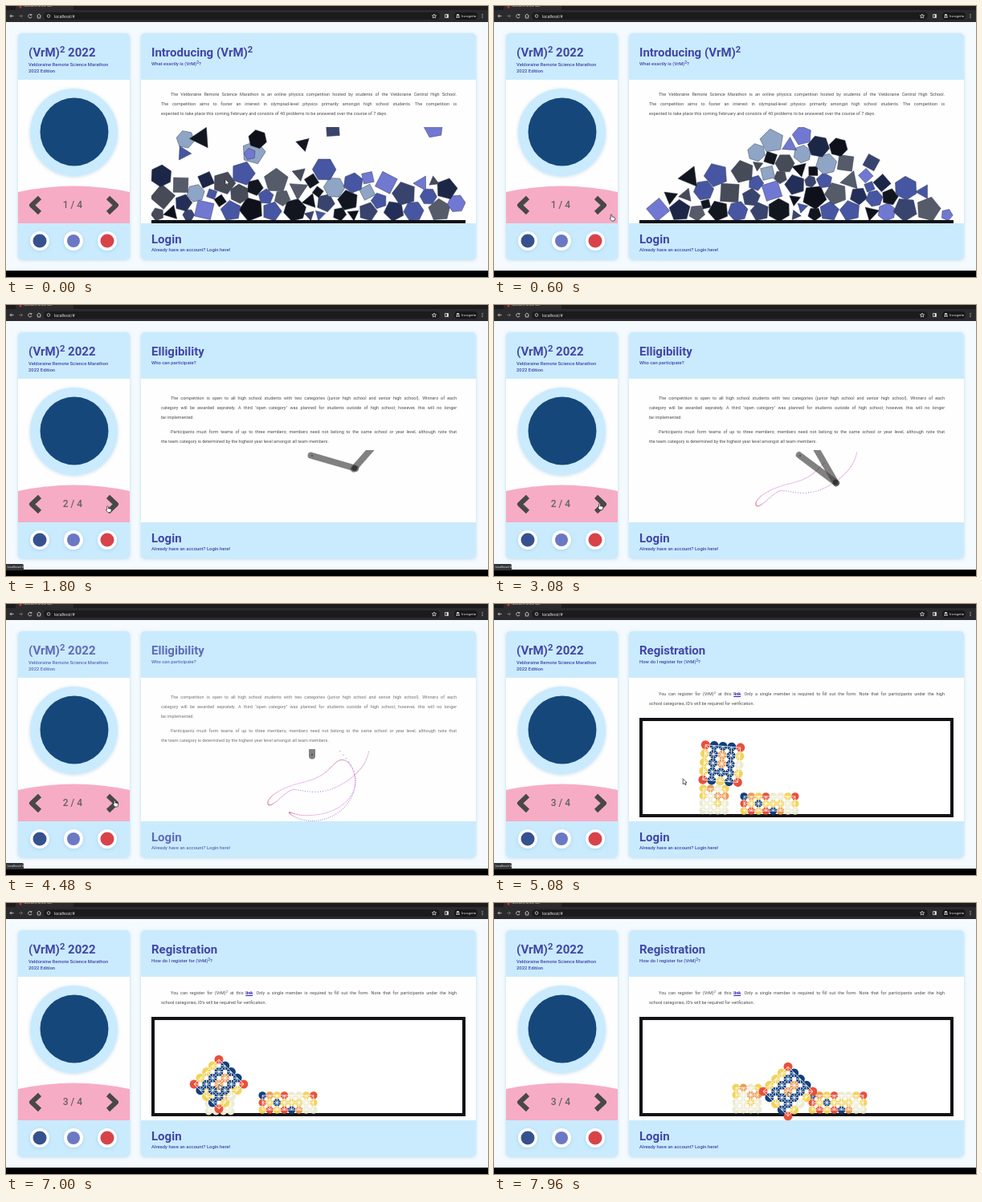
An HTML page with a canvas for the animation above (8000 ms loop, 600 by 338 pixels).

```html
<!DOCTYPE html>
<html lang="en">
<head>
<meta charset="utf-8">
<title>Physics competition</title>
<style>
  html, body { margin: 0; width: 100%; height: 100%; overflow: hidden; background: #f4fafe; }
  body { position: relative; font-family: Roboto, sans-serif; color: #4245a8; }
  svg, canvas { position: absolute; left: 0; top: 0; width: 600px; height: 338px; }
  .label { position: absolute; white-space: nowrap; font-weight: 500; font-size: 5.9px; line-height: 8px; }
  .title { font-weight: 700; font-size: 15px; line-height: 16px; }
  sup { font-size: 75%; line-height: 0; position: relative; top: -.42em; vertical-align: baseline; }
  .page { position: absolute; inset: 0; visibility: hidden; }
  .line { position: absolute; left: 193px; width: 368px; box-sizing: border-box; line-height: 12px;
    font-size: 5.5px; color: #4c4c4c; white-space: nowrap; }
  .indent { padding-left: 12px; }
  .full { text-align-last: justify; white-space: normal; word-spacing: -.3px; }
  .line b { color: #2a1fb8; text-decoration: underline; }
  #counter { position: absolute; left: 58px; top: 240px; width: 50px; text-align: center;
    font-size: 12px; line-height: 16px; font-weight: 500; color: #626262; }
  .chrome { color: #e4e4e4; font-size: 5px; font-weight: 400; }
  #status { position: absolute; left: 0; top: 323px; width: 22px; height: 8px; background: #333438;
    color: #ddd; font-size: 4px; line-height: 8px; text-indent: 1.5px; border-radius: 0 2px 0 0; }
  .floor { position: absolute; left: 181px; top: 267px; width: 391px; height: 4px; background: #111015; }
  .tank { position: absolute; left: 181px; top: 142px; width: 391px; height: 124px; box-sizing: border-box;
    border: 4px solid #141217; background: #fff; }
</style>
</head>
<body>
<svg viewBox="0 0 600 338">
  <defs>
    <filter id="soft" x="-20%" y="-20%" width="140%" height="140%">
      <feDropShadow dx="0" dy="1" stdDeviation="2" flood-color="#7fb4d4" flood-opacity=".45"/>
    </filter>
    <clipPath id="left"><rect x="15" y="34" width="139" height="282" rx="5"/></clipPath>
  </defs>
  <g filter="url(#soft)" fill="#caebfd">
    <rect x="15" y="34" width="139" height="282" rx="5"/>
    <rect x="168" y="34" width="417" height="282" rx="5"/>
  </g>
  <g clip-path="url(#left)">
    <path d="M15 92h139v179H15z" fill="#fefefe"/>
    <path d="M15 232Q84.500 217 154 232V271H15z" fill="#f7acc5"/>
  </g>
  <path d="M168 92h417v179H168z" fill="#fefefe"/>
  <g filter="url(#soft)">
    <circle cx="84.500" cy="157.500" r="54.500" fill="#caebfd"/>
    <g fill="#fff">
      <circle cx="42" cy="293" r="12"/><circle cx="84" cy="293" r="12"/><circle cx="126" cy="293" r="12"/>
    </g>
  </g>
  <circle cx="85" cy="157" r="42.500" fill="#15477a"/>
  <circle cx="42" cy="293" r="8.500" fill="#35528f"/>
  <circle cx="84" cy="293" r="8" fill="#6b78c4"/>
  <circle cx="126" cy="293" r="8.500" fill="#d8434a"/>
  <path d="M42 239L32 248.500L42 258M127 239L137 248.500L127 258" fill="none" stroke="#484848" stroke-width="6" stroke-linejoin="round"/>

  <path d="M0 0h600v20H0z" fill="#2b2b2e"/>
  <path d="M0 0h600v5H0z" fill="#1c1c1f"/>
  <path d="M12 0h72v5H12z" fill="#2b2b2e"/>
  <path d="M0 330h600v8H0z" fill="#000"/>
  <rect x="47" y="8" width="493" height="9" rx="4.500" fill="#1b1b1e"/>
  <rect x="558" y="8" width="29" height="9" rx="4.500" fill="#17171a"/>
  <g fill="none" stroke="#d6d6d6" stroke-width=".8">
    <path d="M9.500 12.500H5M7 10.500L5 12.500L7 14.500"/>
    <path d="M16 12.500h4.500M18.500 10.500L20.500 12.500L18.500 14.500" stroke="#777"/>
    <path d="M31.500 11.200A2.200 2.200 0 1 0 32 13.200M31.800 10v1.500h-1.500"/>
    <path d="M38.500 12.300L41 10L43.500 12.300M39.300 12v3h3.400v-3"/>
    <circle cx="53" cy="12.500" r="1.800"/>
    <path d="M533 10l.8 1.800 1.900.1-1.500 1.200.5 1.900-1.700-1.100-1.700 1.100.5-1.900-1.500-1.200 1.900-.1z"/>
    <path d="M546.500 10.500h4v4h-4zM549 10.500v4"/>
  </g>
  <path d="M549 10.500h1.500v4H549zM560.500 12h4v-.7h-.7l-.5-1.300h-1.600l-.5 1.300h-.7z" fill="#e4e4e4"/>
  <g fill="#e4e4e4">
    <circle cx="561.400" cy="13.800" r="1"/><circle cx="563.700" cy="13.800" r="1"/>
    <circle cx="593" cy="10.500" r=".6"/><circle cx="593" cy="12.500" r=".6"/><circle cx="593" cy="14.500" r=".6"/>
  </g>
  <circle cx="18" cy="1" r="1.500" fill="#c33"/>
</svg>
<div class="label chrome" style="left:60px;top:8.500px">localhost/#</div>
<div class="label chrome" style="left:567px;top:8.500px;font-size:4.400px">Incognito</div>
<div class="label chrome" style="left:22px;top:-4.500px;font-size:4px">Welcome to our site</div>

<div id="texts">
  <div class="label title" style="left:28px;top:50px">(VrM)<sup>2</sup> 2022</div>
  <div class="label" style="left:28px;top:69px">Veldoraine Remote Science Marathon<br>2022 Edition</div>
  <div class="label title" style="left:181px;top:283px">Login</div>
  <div class="label" style="left:181px;top:300px">Already have an account? Login here!</div>

  <section class="page">
    <div class="label title" style="left:181px;top:50px">Introducing (VrM)<sup>2</sup></div>
    <div class="label" style="left:181px;top:67.500px">What exactly is (VrM)<sup>2</sup>?</div>
    <div class="line full indent" style="top:103.500px">The Veldoraine Remote Science Marathon is an online physics competition hosted by students of the Veldoraine Central High School.</div>
    <div class="line full" style="top:115.500px">The competition aims to foster an interest in olympiad-level physics primarily amongst high school students. The competition is</div>
    <div class="line" style="top:127.500px">expected to take place this coming February and consists of 40 problems to be answered over the course of 7 days.</div>
    <div class="floor"></div>
  </section>
  <section class="page">
    <div class="label title" style="left:181px;top:50px">Elligibility</div>
    <div class="label" style="left:181px;top:67.500px">Who can participate?</div>
    <div class="line full indent" style="top:109.500px">The competition is open to all high school students with two categories (junior high school and senior high school). Winners of each</div>
    <div class="line full" style="top:121.500px">category will be awarded seprately. A third "open category" was planned for students outside of high school; however, this will no longer</div>
    <div class="line" style="top:133.500px">be implemented.</div>
    <div class="line full indent" style="top:151.500px">Participants must form teams of up to three members; members need not belong to the same school or year level, although note that</div>
    <div class="line" style="top:163.500px">the team category is determined by the highest year level amongst all team members.</div>
  </section>
  <section class="page">
    <div class="label title" style="left:181px;top:50px">Registration</div>
    <div class="label" style="left:181px;top:67.500px">How do I register for (VrM)<sup>2</sup>?</div>
    <div class="line full indent" style="top:105.500px">You can register for (VrM)<sup>2</sup> at this <b>link</b>. Only a single member is required to fill out the form. Note that for participants under the high</div>
    <div class="line" style="top:117.500px">school categories, ID's will be required for verification.</div>
    <div class="tank"></div>
  </section>
</div>
<div id="counter"></div>
<div id="status">localhost/#</div>
<canvas></canvas>

<script>
const LOOP = 8000, PAGE_2 = 1760, PAGE_3 = 4520, SWING = 1800;
const pages = document.querySelectorAll('.page');
const [texts, counter, status] = ['texts', 'counter', 'status'].map(id => document.getElementById(id));
const canvas = document.querySelector('canvas'), ctx = canvas.getContext('2d');
const scale = Math.max(1, window.devicePixelRatio || 1);
canvas.width = 600 * scale;
canvas.height = 338 * scale;

const clamp = v => Math.min(1, Math.max(0, v));
const ramp = (t, from, to) => clamp((t - from) / (to - from));
const ease = u => u * u * (3 - 2 * u);
const mix = (a, b, u) => a + (b - a) * u;

let seed = 23;
const random = () => (seed = (seed * 16807) % 2147483647) / 2147483647;
const between = (a, b) => mix(a, b, random());
const pick = list => list[Math.floor(random() * list.length)];

// Both read rows of [time, ...values]: glide rests at each row, curve flows through them.
const segment = (rows, t) => Math.max(0, Math.min(rows.length - 2, rows.findIndex(row => row[0] > t) - 1));
function glide(rows, t) {
  if (t >= rows[rows.length - 1][0]) return rows[rows.length - 1].slice(1);
  const i = segment(rows, t), p = rows[i], q = rows[i + 1];
  const u = ease(ramp(t, p[0], q[0]));
  return p.slice(1).map((v, k) => mix(v, q[k + 1], u));
}
function curve(rows, t) {
  if (t >= rows[rows.length - 1][0]) return rows[rows.length - 1].slice(1);
  const i = segment(rows, t), p = rows[i], q = rows[i + 1];
  const before = rows[i - 1] || p, after = rows[i + 2] || q;
  const span = q[0] - p[0], u = ramp(t, p[0], q[0]);
  return p.slice(1).map((v, k) => {
    const n = k + 1, d = q[n] - v;
    const m0 = (q[n] - before[n]) / (q[0] - before[0]) * span;
    const m1 = (after[n] - p[n]) / (after[0] - p[0]) * span;
    return v + u * (m0 + u * (3 * d - 2 * m0 - m1 + u * (m0 + m1 - 2 * d)));
  });
}

function clipped(x, y, w, h, draw) {
  ctx.save();
  ctx.beginPath();
  ctx.rect(x, y, w, h);
  ctx.clip();
  draw();
  ctx.restore();
}

function dot(x, y, r) {
  ctx.beginPath();
  ctx.arc(x, y, r, 0, 7);
  ctx.fill();
}

const tones = ['#0e1119', '#12161f', '#1c2647', '#232f58', '#39446e', '#4656a3', '#4656a3', '#7078d2', '#464b57', '#555b68', '#8fa5c6'];
const polygons = Array.from({ length: 60 }, () => ({
  r: between(7, 16), sides: pick([3, 4, 4, 5, 5, 5, 6]), color: pick(tones),
  angle: between(0, 6.28), spin: between(-2.5, 2.5)
}));

// Drops each shape where it lands deepest; a steeper slope piles them towards the middle.
function heap(slope, airborne) {
  const placed = [];
  for (const p of polygons) {
    const r = p.r * .88;
    let best = null;
    for (let tries = 0; tries < 70; tries++) {
      const x = between(181 + r, 572 - r);
      let y = 267 - r;
      for (const o of placed) {
        const reach = r + o.r, dx = x - o.x;
        if (Math.abs(dx) < reach) y = Math.min(y, o.y - Math.sqrt(reach * reach - dx * dx));
      }
      const depth = y - slope * Math.abs(x - 380);
      if (!best || depth > best.depth) best = { x, y, r, depth };
    }
    if (polygons.length - placed.length <= airborne) best = { x: between(185, 565), y: between(152, 185), r };
    placed.push(best);
  }
  return placed;
}
const scattered = heap(.04, 9), piled = heap(.5, 0), settled = piled.map(p => ({
  x: p.x + (p.x - 380) * .12, y: p.y + Math.max(0, 250 - p.y) * .25
}));

function drawPolygons(t) {
  const u = ease(ramp(t, 0, 600)), v = ramp(t, 600, PAGE_2);
  clipped(181, 151, 391, 116, () => {
    ctx.lineWidth = .5;
    ctx.strokeStyle = '#343a52';
    polygons.forEach((p, n) => {
      const x = mix(scattered[n].x, mix(piled[n].x, settled[n].x, v), u);
      const y = mix(scattered[n].y, mix(piled[n].y, settled[n].y, v), u);
      const angle = p.angle + p.spin * (u + v * .3);
      ctx.beginPath();
      for (let i = 0; i < p.sides; i++) {
        const a = angle + i * 2 * Math.PI / p.sides;
        ctx.lineTo(x + p.r * Math.cos(a), y + p.r * Math.sin(a));
      }
      ctx.closePath();
      ctx.fillStyle = p.color;
      ctx.fill();
      ctx.stroke();
    });
  });
}

// Double pendulum: time and both angles, in degrees from straight down.
const swing = [
  [1800, 74, 139], [2110, 5, 120], [2290, -60, 53], [2500, -41, -41], [2780, 0, -131], [3080, 53, -150],
  [3320, 33, -239], [3560, 5, -340], [3760, -8, -408], [3940, 9, -399], [4300, 90, -362], [4480, 180, -440]];
const ARM = 55, PIVOT = { x: 381, y: 188 };
const along = (from, degrees, length) => ({
  x: from.x + length * Math.sin(degrees * Math.PI / 180),
  y: from.y + length * Math.cos(degrees * Math.PI / 180)
});
function pendulum(t) {
  const [a1, a2] = curve(swing, t), elbow = along(PIVOT, a1, ARM);
  return { a1, a2, elbow, middle: along(elbow, a2, ARM / 2) };
}
const trail = [];
for (let t = SWING; t <= 4480; t += 9) trail.push({ t, ...pendulum(t).middle });

function drawRod(from, angle) {
  const a = along(from, angle, -1.5), b = along(from, angle, ARM + 1.5);
  ctx.beginPath();
  ctx.moveTo(a.x, a.y);
  ctx.lineTo(b.x, b.y);
  ctx.stroke();
}

function drawPendulum(t) {
  const { a1, a2, elbow } = pendulum(t);
  clipped(181, 181, 391, 90, () => {
    for (let i = 1; i < trail.length && trail[i].t < t; i++) {
      const p = trail[i], speed = Math.hypot(p.x - trail[i - 1].x, p.y - trail[i - 1].y);
      ctx.fillStyle = `hsl(${360 - 120 * clamp(speed / 4)}, 50%, 66%)`;
      ctx.fillRect(p.x - .5, p.y - .5, 1, 1);
    }
    ctx.lineCap = 'round';
    ctx.lineWidth = 8;
    ctx.strokeStyle = 'rgba(70,70,72,.68)';
    drawRod(PIVOT, a1);
    drawRod(elbow, a2);
    ctx.fillStyle = '#555';
    dot(PIVOT.x, PIVOT.y, 1.2);
    ctx.fillStyle = '#333';
    dot(elbow.x, elbow.y, 3.2);
  });
}

// Soft bodies: grids of discs whose path gives time, centre and tilt in degrees.
const RED = '#e8503c', BLUE = '#123f7c', YELLOW = '#f3d35c', CREAM = '#ececd3', ORANGE = '#ee9a52';
function softBody(cols, rows, r, gap, path, paint) {
  const cells = [];
  for (let j = 0; j < rows; j++) for (let i = 0; i < cols; i++) {
    const edges = (i % (cols - 1) === 0) + (j % (rows - 1) === 0);
    cells.push({ i, j, color: pick(paint(edges)) });
  }
  return { cols, rows, r, gap, path, cells };
}
const small = softBody(4, 4, 4.7, 9.2,
  [[4520, 274, 235, 0], [4800, 274, 244, 0], [5800, 274, 244, 3], [7000, 266, 246, 0], [7960, 315, 244, 0]],
  () => [CREAM, CREAM, CREAM, YELLOW, YELLOW, ORANGE]);
const wide = softBody(8, 3, 4.7, 9.1,
  [[5800, 343, 249, 0], [6500, 349, 249, 0], [6900, 349, 249, 0], [7960, 428, 249, 0]],
  () => [CREAM, CREAM, YELLOW, ORANGE, ORANGE, YELLOW, CREAM, RED, BLUE]);
const big = softBody(5, 5, 5.5, 10.9,
  [[4520, 283, 182, 0], [5000, 283, 199, 4], [5800, 295, 203, 18.5], [7000, 265, 226, 45], [7960, 366, 235, 45]],
  edges => edges === 2 ? [RED] : edges ? [YELLOW, BLUE, YELLOW, CREAM] : [BLUE, BLUE, BLUE, BLUE, ORANGE]);

function drawBody({ cols, rows, r, gap, path, cells }, t) {
  const [x, y, tilt] = glide(path, t);
  ctx.save();
  ctx.translate(x, y);
  ctx.rotate(tilt * Math.PI / 180);
  ctx.translate(-(cols - 1) * gap / 2, -(rows - 1) * gap / 2);
  for (const { i, j, color } of cells) {
    ctx.fillStyle = color;
    dot(i * gap, j * gap, r);
  }
  ctx.strokeStyle = '#fff';
  ctx.lineWidth = .8;
  ctx.beginPath();
  for (const { i, j } of cells) for (const [di, dj] of [[1, 0], [0, 1], [1, 1], [-1, 1]]) {
    if (i + di < 0 || i + di >= cols || j + dj >= rows) continue;
    ctx.moveTo(i * gap, j * gap);
    ctx.lineTo((i + di) * gap, (j + dj) * gap);
  }
  ctx.stroke();
  ctx.restore();
}

// The pointer ends up holding the big body.
const pointer = [[0, 273, 216], [600, 145, 260], [1400, 125, 251], [4480, 134, 245], [5500, 294, 202]];
const arrow = new Path2D('M0 0V7L1.700 5.600L2.800 8L3.900 7.500L2.900 5.200H5z');
const hand = new Path2D('M1 0Q2 0 2 1V3L5 3.600Q6 4 5.800 5L5 8H1.500L-1 5Q-.8 4 .3 4.600V1Q.3 0 1 0z');

function drawPointer(t) {
  const [x, y] = glide(t < 5500 ? pointer : big.path, t);
  const shape = t > 560 && t < 4700 ? hand : arrow;
  ctx.save();
  ctx.translate(x, y);
  ctx.fillStyle = '#fff';
  ctx.strokeStyle = '#222';
  ctx.lineWidth = .7;
  ctx.fill(shape);
  ctx.stroke(shape);
  ctx.restore();
}

function render(t) {
  const page = t < PAGE_2 ? 0 : t < PAGE_3 ? 1 : 2;
  pages.forEach((el, i) => el.style.visibility = i === page ? 'visible' : 'hidden');
  counter.textContent = `${page + 1} / 4`;
  texts.style.opacity = page === 1 ? 1 - .22 * ramp(t, 3400, 4480) : 1;
  status.style.opacity = t < 1000 ? 0 : 1 - ramp(t, 5700, 5900);

  ctx.setTransform(scale, 0, 0, scale, 0, 0);
  ctx.clearRect(0, 0, 600, 338);
  if (page === 0) drawPolygons(t);
  else if (page === 1) drawPendulum(t);
  else [small, wide, big].forEach(body => drawBody(body, t));
  drawPointer(t);
}

const start = performance.now();
function tick() {
  render((performance.now() - start) % LOOP);
  requestAnimationFrame(tick);
}
tick();
</script>
</body>
</html>
```
